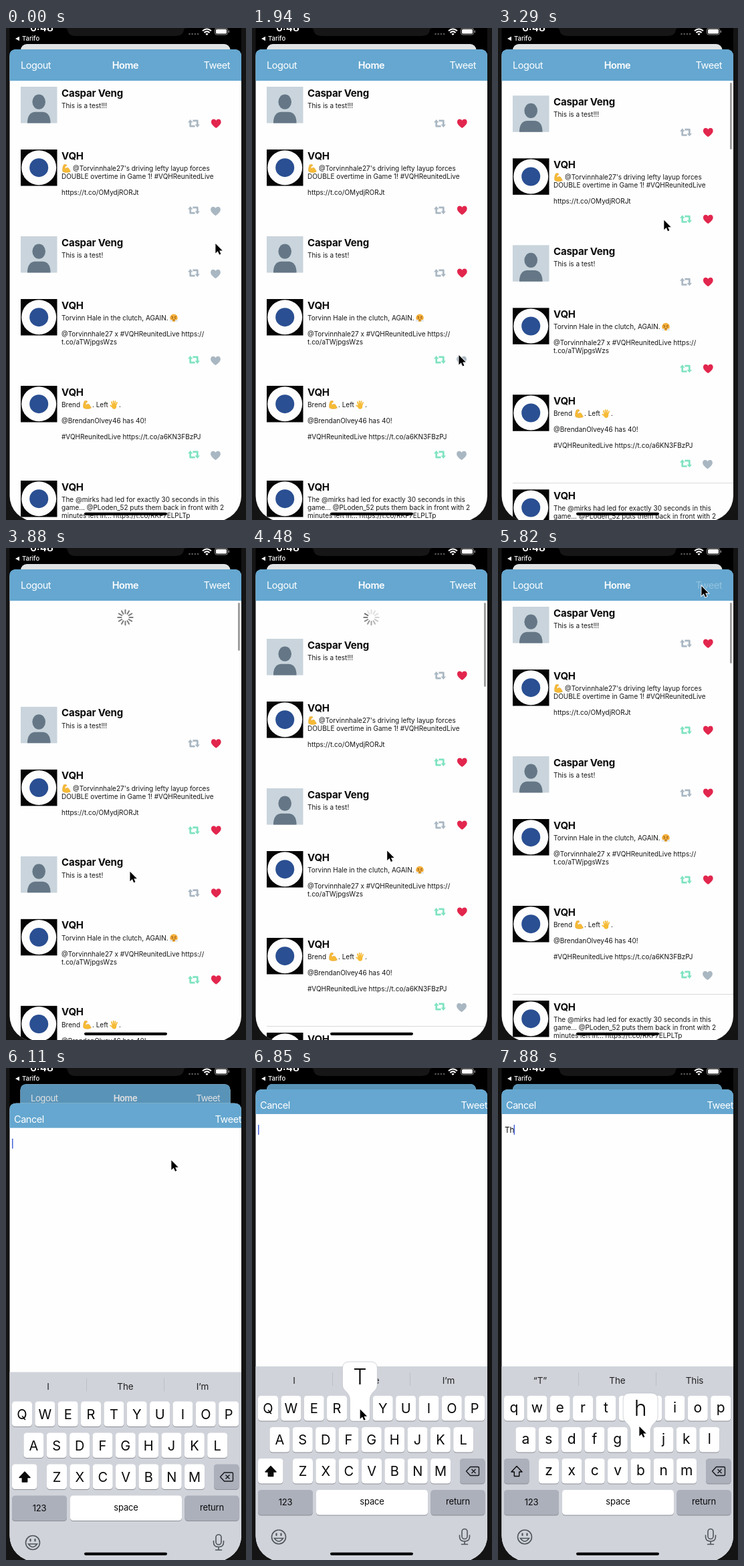
Animation of 359 by 737 pixels, one loop 8 s. Source, as an HTML page:

```html
<!DOCTYPE html>
<html lang="en">
<head>
<meta charset="utf-8">
<title>Timeline app</title>
<style>
  html, body { margin: 0; width: 100%; height: 100%; overflow: hidden; background: #141415; }
  svg { display: block; width: 100vw; height: 100vh; font-family: Inter, Roboto, sans-serif; }
  text { white-space: pre; }
  .bar { font-size: 14.5px; letter-spacing: -.45px; fill: #fff; }
  .name { font-size: 15px; font-weight: 700; letter-spacing: -.2px; fill: #0b0b0b; }
  .body { font-size: 10px; fill: #161616; }
  .word { font-size: 13.5px; letter-spacing: -.1px; fill: #222; }
  .wide { font-size: 13px; letter-spacing: -.2px; fill: #0a0a0a; }
  .mid { text-anchor: middle; }
  .end { text-anchor: end; }
</style>
</head>
<body>
<svg id="stage" viewBox="0 0 359 737" xmlns="http://www.w3.org/2000/svg"></svg>
<script>
const LOOP = 8000, HOLD = 148.6, TICK = 149.2;
const BLUE = '#65a7d0', GREY = '#a9b7c2', RED = '#e2264d', GREEN = '#7fe3c0';
const stage = document.getElementById('stage');
const $ = id => document.getElementById(id);
const set = (id, attrs) => { for (const k in attrs) $(id).setAttribute(k, attrs[k]); };
const show = (id, on) => set(id, { visibility: on ? 'visible' : 'hidden' });
const text = (x, y, cls, s, extra = '') => `<text x="${x}" y="${y}" class="${cls}" ${extra}>${s}</text>`;
const rect = (x, y, w, h, r, fill, extra = '') =>
  `<rect x="${x}" y="${y}" width="${w}" height="${h}" rx="${r}" fill="${fill}" ${extra}/>`;

// ---- timeline rows ----
const emoji = {
  arm: '<path fill="#f6bb35" stroke="#d8922a" stroke-width=".4" d="M3 1.2L6 .8C7.4 1.2 7.6 3 6.4 3.6L5 3.8C4.6 5.2 4.8 6.6 5 7.6 7 5 10 5.2 11 8L13 11.5C10 13.6 3 13.6 1.2 11 .6 8 1.4 4 3 1.2z"/>',
  face: '<circle cx="7" cy="6.8" r="5.8" fill="#f6b03a"/><path d="M3.4 4.4l2.6 1.3M10.6 4.4L8 5.7M3.6 7q1.2.9 2.3 0M8.1 7q1.1.9 2.3 0M5.4 10.2q1.6-1 3.2 0" fill="none" stroke="#6d3d12" stroke-width=".9"/><ellipse cx="2.9" cy="11" rx="2.5" ry="1.6" fill="#e3ebf4"/><ellipse cx="11.1" cy="11" rx="2.5" ry="1.6" fill="#e3ebf4"/>',
  hand: '<path d="M5 8L3.4 2.6M6.5 7L6.2 1.4M8.2 7L9 1.7M9.8 8L11.6 3.5M5.4 10.6L1.8 8" stroke="#f6bb35" stroke-width="1.8" stroke-linecap="round"/><ellipse cx="7.3" cy="9.5" rx="3.4" ry="3.7" fill="#f6bb35"/>'
};
const CLUB = 'VQH', USER = 'Caspar Veng', TAG = '#VQHReunitedLive';
// each line: [line number, x, text]; emoji: [name, x]
const rows = [
  { y: 88, icons: 55, who: USER, lines: [[0, 83, 'This is a test!!!']] },
  { y: 182, icons: 91, who: CLUB, emoji: [['arm', 83.5]], lines: [
    [0, 100, "@Torvinnhale27's driving lefty layup forces"],
    [1, 83, 'DOUBLE overtime in Game 1! ' + TAG],
    [3, 83, 'https://t.co/OMydjRORJt']] },
  { y: 312, icons: 55, who: USER, lines: [[0, 83, 'This is a test!']] },
  { y: 406, icons: 91, who: CLUB, emoji: [['face', 244]], lines: [
    [0, 83, 'Torvinn Hale in the clutch, AGAIN.'],
    [2, 83, `@Torvinnhale27 x ${TAG} https://`],
    [3, 83, 't.co/aTWjpgsWzs']] },
  { y: 536, icons: 103, who: CLUB, emoji: [['arm', 114.5], ['hand', 154.5]], lines: [
    [0, 83, 'Brend'], [0, 129, '. Left'], [0, 169, '.'],
    [2, 83, '@BrendanOlvey46 has 40!'],
    [4, 83, TAG + ' https://t.co/a6KN3FBzPJ']] },
  { y: 678, icons: 115, who: CLUB, lines: [
    [0, 83, 'The @mirks had led for exactly 30 seconds in this'],
    [1, 83, 'game... @PLoden_52 puts them back in front with 2'],
    [2, 83, 'minutes left in... https://t.co/RKF7ELPLTp']] }
];
const person = rect(22, 0, 54.5, 54.5, 0, '#c9d4dc') +
  '<ellipse cx="49.2" cy="22.6" rx="9.8" ry="11.2" fill="#657786"/>' +
  '<path d="M32 54.5V52Q33 39 43 37.8H55.5Q65.500 39 66.500 52V54.500Z" fill="#657786"/>';
const badge = rect(22, 0, 54.5, 54.5, 0, '#050505') +
  '<circle cx="49.2" cy="27.2" r="26" fill="#fdfdfd"/><circle cx="49.2" cy="27.2" r="14" fill="#2a4f92"/>';
const share = '<path d="M-5.3-3V4.2H1.6M-1.6-4.2H5.3V3" fill="none" stroke="currentColor" stroke-width="2.7" stroke-linejoin="round"/>' +
  '<path d="M-9-1.600L-5.300-6-1.600-1.600ZM9 1.600L5.300 6 1.600 1.600Z" fill="currentColor"/>';
const heart = 'M0 7C-2 5.2-7.4 2-7.4-2.3-7.4-7.4-1.6-7.8 0-4.2 1.6-7.8 7.4-7.4 7.4-2.3 7.4 2 2 5.2 0 7Z';

const rowSvg = (r, i) => `<g transform="translate(0 ${r.y})">` +
  (r.who === USER ? person : badge) + text(83, 14.5, 'name', r.who) +
  r.lines.map(([n, x, s]) => text(x, 31.8 + 12 * n, 'body', s)).join('') +
  (r.emoji || []).map(([e, x]) => `<g transform="translate(${x} 21.5)">${emoji[e]}</g>`).join('') +
  `<g id="share${i}" transform="translate(281 ${r.icons})">${share}</g>` +
  `<path id="heart${i}" d="${heart}"/></g>`;

const ticks = Array.from({ length: 12 }, (_, i) =>
  `<path id="tick${i}" d="M0-6V-11.2" transform="rotate(${i * 30})"/>`).join('');

// ---- keyboard ----
const KEY = 34.35, keys = {};
const key = (x, y, w, fill, id = '') =>
  rect(x, y + 1, w, 37.6, 4.6, '#8b8e95') + rect(x, y, w, 37.6, 4.6, fill, id && `id="${id}"`);
const letters = [['QWERTYUIOP', 9, 491], ['ASDFGHJKL', 26.4, 538], ['ZXCVBNM', 61, 585]]
  .map(([s, x0, y]) => [...s].map((c, i) => {
    const x = x0 + KEY * i;
    keys[c] = { x, y };
    return key(x, y, 30, '#fff') + `<text id="key${c}" x="${x + 15}" class="mid" fill="#080808"></text>`;
  }).join('')).join('');
const keyboard = rect(5, 447, 347, 300, 0, '#d0d3da') +
  rect(120, 456, 1, 20, 0, '#bcbfc6') + rect(236, 456, 1, 20, 0, '#bcbfc6') +
  [63, 178.5, 294].map((x, i) => text(x, 473, 'word mid', '', `id="word${i}"`)).join('') +
  letters +
  key(9, 585, 37.5, '#fff', 'shiftKey') + key(311, 585, 37.5, '#acb0bb') +
  '<path id="shift" d="M28 596.5L36 605H31.7V611.5H24.3V605H20Z" stroke="#0a0a0a" stroke-width="1.4" stroke-linejoin="round"/>' +
  '<path d="M320.5 604L326.5 597.5H338Q339.5 597.5 339.5 599V609Q339.5 610.5 338 610.5H326.5ZM328.5 601L334.5 607M334.5 601L328.5 607" fill="none" stroke="#15171a" stroke-width="1.4" stroke-linejoin="round"/>' +
  key(9, 632, 82, '#acb0bb') + key(96, 632, 167, '#fff') + key(267.5, 632, 81, '#acb0bb') +
  text(50, 655, 'wide mid', '123') + text(179.5, 654, 'wide mid', 'space') + text(308, 654, 'wide mid', 'return') +
  '<g fill="none" stroke="#50555c" stroke-width="1.6" stroke-linecap="round"><circle cx="40" cy="702.5" r="10.5"/>' +
  '<path d="M33.5 704.5Q40 713.5 46.5 704.5Z"/><path d="M36.5 697.5V700M43.5 697.5V700" stroke-width="2.2"/>' +
  '<rect x="314" y="690.5" width="8" height="15" rx="4"/><path d="M310.5 700V702Q310.5 709 318 709T325.5 702V700M318 709V713.5M313.5 713.5H322.5"/></g>';

const bubble = (x, y) => `M${x - 1} ${y - 51}h32q10 0 10 10v25c0 9-11 10-11 22v27q0 5-5 5h-20q-5 0-5-5v-27c0-12-11-13-11-22v-25q0-10 10-10z`;

// ---- whole picture ----
stage.innerHTML = `
<defs>
  <clipPath id="screen"><rect x="5.5" y="-60" width="346.5" height="799" rx="38"/></clipPath>
  <clipPath id="under"><rect x="5" y="79" width="347" height="660"/></clipPath>
</defs>
${rect(0, 0, 359, 737, 0, '#141415')}
<g clip-path="url(#screen)">
  ${rect(5, 0, 347, 739, 0, '#000')}
  <path d="M86 0Q92 0 92 3 93 12 105 12H253Q265 12 266 3 266 0 272 0Z" fill="#161617"/>
  ${text(53.5, 5, 'mid', '6:48', 'font-size="15.5" font-weight="600" fill="#fff"')}
  <path d="M14 16L20 12.7V19.3Z" fill="#fff"/>
  ${text(24, 19, '', 'Tarifo', 'font-size="9.5" font-weight="500" fill="#fff"')}
  ${[0, 1, 2, 3].map(i => `<circle cx="${274.5 + 4.2 * i}" cy="9" r="1.3" fill="#58585a"/>`).join('')}
  <g fill="none" stroke="#fff" stroke-width="2"><path d="M294 4.3Q300.5-1.3 307 4.3M296.4 7Q300.5 3.3 304.6 7"/></g>
  <path d="M298.3 8.8Q300.5 7 302.7 8.8L300.5 11Z" fill="#fff"/>
  <rect x="312.5" y=".3" width="19" height="9.7" rx="2.8" fill="none" stroke="#8d8d8d"/>
  ${rect(314, 1.8, 16, 6.7, 1.5, '#fff')}${rect(332.7, 3.5, 1.3, 3.5, .6, '#8d8d8d')}
  ${rect(22, 24, 313.5, 60, 9, '#e0e3e4', 'id="rear"')}
  <g id="home">
    ${rect(5, 32, 347, 900, 10, '#fefefe')}
    <g clip-path="url(#under)">
      <g id="spinner" transform="translate(178.5 104)" stroke="#6f6f6f" stroke-width="2" stroke-linecap="round">${ticks}</g>
      <g id="list">${rows.map(rowSvg).join('')}${rect(22, 668, 330, 1, 0, '#d9d9db', 'id="rule"')}</g>
      ${rect(347, 82, 2.8, 90, 1.4, '#9b9b9b', 'id="thumb"')}
    </g>
    <path d="M5 79V42Q5 32 15 32H342Q352 32 352 42V79Z" fill="${BLUE}"/>
    ${text(22, 61, 'bar', 'Logout')}${text(178.5, 61, 'bar mid', 'Home', 'font-weight="600"')}
    ${text(335, 61, 'bar end', 'Tweet', 'id="tweet"')}
    ${rect(5, 32, 347, 900, 10, '#000', 'id="dim"')}
  </g>
  <g id="sheet">
    ${rect(5, 0, 347, 900, 10, '#fefefe')}
    <path d="M5 37V10Q5 0 15 0H342Q352 0 352 10V37Z" fill="${BLUE}"/>
    ${text(12, 29, 'bar', 'Cancel')}${text(352, 29, 'bar end', 'Tweet')}
    ${text(10, 65, '', '', 'id="typed" font-size="11.8" fill="#0b0b0b"')}
    ${rect(9, 53, 1.5, 15, .5, '#4565d6', 'id="caret"')}
  </g>
  <g id="board">${keyboard}</g>
  <g id="pop"><path id="popShape" fill="#fff" stroke="#b4b7be" stroke-width=".6"/><text id="popChar" class="mid" font-size="32" font-weight="300" fill="#080808"></text></g>
  ${rect(117, 725.7, 124, 4.2, 2.1, '#000')}
</g>
<path id="mouse" d="M0 0V14.5L3.4 11.3 5.7 16.6 8 15.6 5.8 10.6H10.4Z" fill="#000" stroke="#fff" stroke-width="1.8" paint-order="stroke"/>`;

// ---- motion ----
// piecewise linear track: [time, value, value...]
const along = (track, t) => {
  let i = 0;
  while (i < track.length - 2 && t >= track[i + 1][0]) i++;
  const a = track[i], b = track[i + 1];
  const p = Math.max(0, Math.min(1, (t - a[0]) / (b[0] - a[0])));
  return a.slice(1).map((v, k) => v + (b[k + 1] - v) * p);
};
const mouse = [[0, 314, 324], [300, 311, 350], [450, 309, 362], [900, 309, 362], [1640, 313, 430],
  [1940, 310, 491], [2090, 304, 287], [2390, 281, 271], [2840, 281, 271], [3140, 304, 264],
  [3290, 246, 290], [3880, 186, 486], [4180, 188, 492], [4480, 203, 454], [4770, 215, 400],
  [5370, 303, 60], [5820, 305, 58], [5970, 288, 86], [6117, 248, 139], [6400, 195, 380],
  [6700, 162, 512], [7300, 163, 513], [7740, 208, 536], [7880, 212, 538]];
const pull = [[3140, 0], [3290, 14], [3590, 102], [3880, 150], [4180, 138], [4330, 72], [4476, 48], [4920, 48], [5220, 6], [5370, 0]];
const thumb = [[3290, 100], [3879, 72], [4180, 80], [4476, 126], [4920, 126], [5370, 91]];
const liked = [0, 750, 1190, 2080, Infinity, Infinity];
const shared = [Infinity, 2690, Infinity, 0, 0, Infinity];

function draw(t) {
  const [mx, my] = along(mouse, t);
  set('mouse', { transform: `translate(${mx - .6} ${my - 1})` });

  rows.forEach((r, i) => {
    const red = t >= liked[i];
    set('share' + i, { color: t >= shared[i] ? GREEN : GREY });
    set('heart' + i, {
      fill: red ? RED : GREY,
      transform: `translate(${red ? 314.3 : 313.5} ${r.icons + (red ? 0 : 1.3)})`
    });
  });

  const [dy] = along(pull, t);
  set('list', { transform: `translate(0 ${dy})` });
  show('rule', t > 3280);
  show('thumb', t > 3280);
  set('thumb', { height: along(thumb, t)[0] });
  show('spinner', dy > 20);
  const spin = t > 4170, head = 10 + (t - 4476) / 83;
  set('spinner', { opacity: t > 4920 ? dy / 48 : 1 });
  for (let i = 0; i < 12; i++) {
    const age = (((Math.floor(head) - i) % 12) + 12) % 12;
    set('tick' + i, { opacity: spin ? Math.max(.22, 1 - age * .1) : i < dy / 9 ? .9 : 0 });
  }
  set('tweet', { opacity: t > 5660 && t < 5960 ? .3 : 1 });

  // compose sheet and keys rise together
  const left = Math.pow(1 - Math.max(0, Math.min(1, (t - 5880) / 343)), 3), up = 1 - left;
  set('home', { transform: `translate(178.5 ${32 - 8 * up}) scale(${1 - .098 * up}) translate(-178.5 -32)` });
  set('dim', { opacity: .12 * up });
  show('rear', up === 0);
  show('sheet', up > 0);
  show('board', up > 0);
  set('sheet', { transform: `translate(0 ${32 + 705 * left})` });
  set('board', { transform: `translate(0 ${290 * left})` });

  const typed = t < 6990 ? '' : t < 7840 ? 'T' : 'Th';
  $('typed').textContent = typed;
  set('caret', { x: 9 + (typed ? $('typed').getComputedTextLength() : 0) });
  const lower = t > 7140;
  for (const c in keys) {
    $('key' + c).textContent = lower ? c.toLowerCase() : c;
    set('key' + c, { y: keys[c].y + (lower ? 24.8 : 26.3), 'font-size': lower ? 21 : 20 });
  }
  set('shiftKey', { fill: lower ? '#acb0bb' : '#fff' });
  set('shift', { fill: lower ? 'none' : '#0a0a0a' });
  const words = t > 7280 ? ['“T”', 'The', 'This'] : ['I', 'The', 'I’m'];
  words.forEach((w, i) => { $('word' + i).textContent = w; });

  const press = t > 7840 ? 'H' : t > 6840 && t < 7140 ? 'T' : '';
  show('pop', press !== '');
  if (press) {
    const { x, y } = keys[press];
    set('popShape', { d: bubble(x, y) });
    set('popChar', { x: x + 15, y: y - 17 });
    $('popChar').textContent = lower ? press.toLowerCase() : press;
  }
}

const start = performance.now();
function loop(now) {
  const t = Math.max(0, now - start) % LOOP;
  draw(Math.floor(t / HOLD) * TICK);
  requestAnimationFrame(loop);
}
draw(0);
requestAnimationFrame(loop);
</script>
</body>
</html>
```
